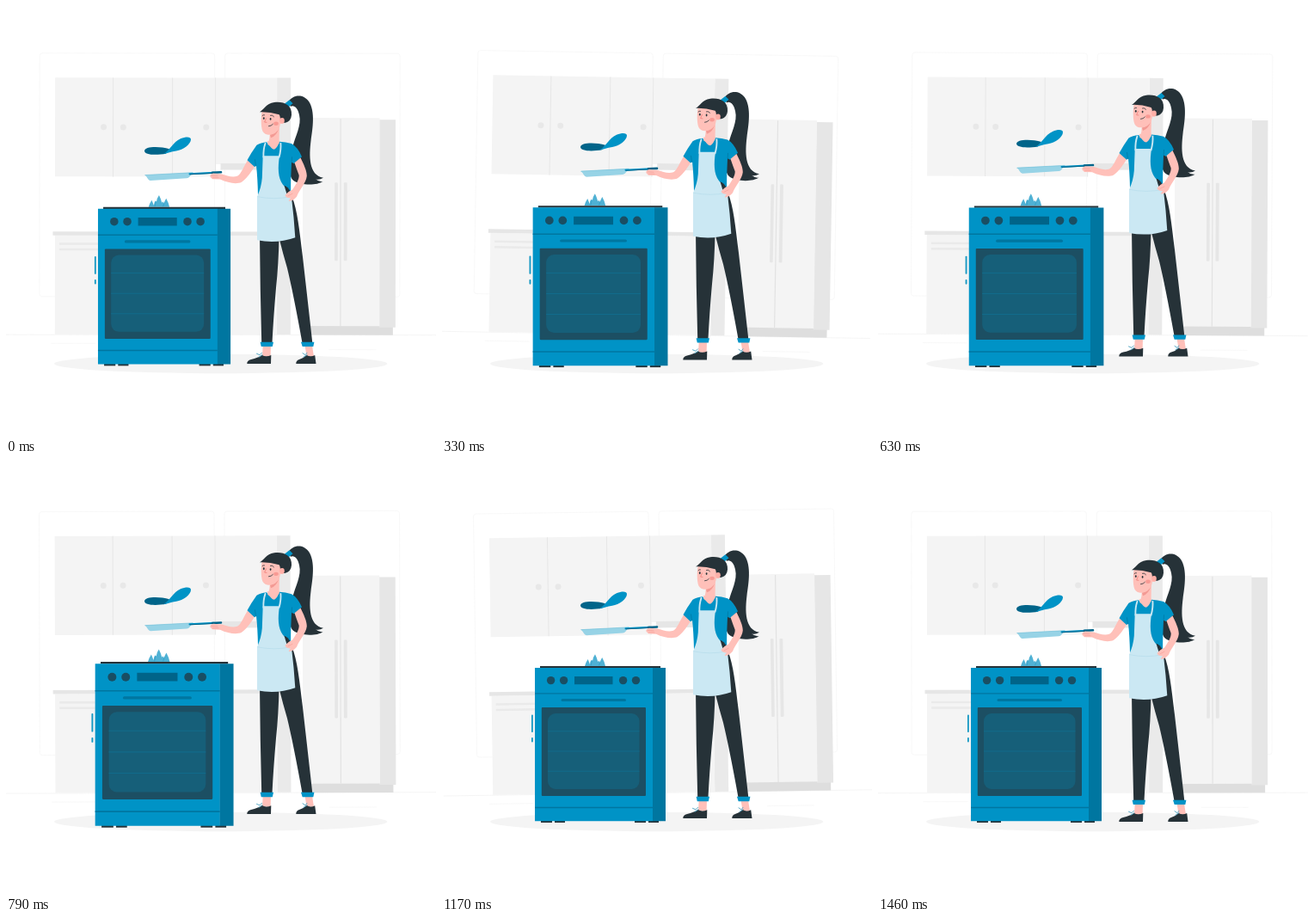
These frames come from a looping animation (500 px wide and 500 px high, 1.5 s). An HTML page with a canvas:

```html
<!DOCTYPE html>
<html lang="en">
<head>
<meta charset="utf-8">
<title>Cooking</title>
<style>
  html, body { margin: 0; width: 100%; height: 100%; overflow: hidden; background: #fff; }
  canvas { display: block; width: 500px; height: 500px; }
</style>
</head>
<body>
<canvas id="stage"></canvas>
<script>
const LOOP = 1500;
const STEP = LOOP / 36;
const canvas = document.getElementById('stage');
const ctx = canvas.getContext('2d');
const ratio = window.devicePixelRatio || 1;
canvas.width = canvas.height = 500 * ratio;

const BLUE = '#0093c6', DEEP = '#0076a0', NAVY = '#006489', DARK = '#263238';
const SKIN = '#ffc0b9', APRON = '#cbe8f3';
const WALL = '#f4f4f4', SHADE = '#e6e6e6', SIDE = '#eaeaea';

function rect(color, x1, y1, x2, y2, radius = 0) {
  ctx.fillStyle = color;
  ctx.beginPath();
  ctx.roundRect(x1, y1, x2 - x1, y2 - y1, radius);
  ctx.fill();
}

function dot(color, x, y, rx, ry = rx) {
  ctx.fillStyle = color;
  ctx.beginPath();
  ctx.ellipse(x, y, rx, ry, 0, 0, Math.PI * 2);
  ctx.fill();
}

function shape(color, d) {
  ctx.fillStyle = color;
  ctx.fill(new Path2D(d));
}

function line(color, width, d) {
  ctx.strokeStyle = color;
  ctx.lineWidth = width;
  ctx.lineCap = 'round';
  ctx.stroke(new Path2D(d));
}

// Piecewise linear track of [time, value] pairs, time in 0..1.
function track(keys, p) {
  const i = keys.findIndex(([time]) => time >= p);
  if (i < 1) return keys[0][1];
  const [t0, v0] = keys[i - 1], [t1, v1] = keys[i];
  return v0 + (v1 - v0) * (p - t0) / (t1 - t0);
}

const SWAY = [[0, 0], [.25, 1], [.75, -1], [1, 0]];
const BEAT = [[0, 1], [.1, 1.1], [.3, 1], [.4, 1], [.5, 1.1], [.6, 1], [1, 1]];
const FLOAT = [[0, 0], [.5, -10], [1, 0]];

function about(x, y, change, draw) {
  ctx.save();
  ctx.translate(x, y);
  change();
  ctx.translate(-x, -y);
  draw();
  ctx.restore();
}

function drawRoom() {
  for (const x of [39, 254.5]) {
    ctx.strokeStyle = '#f7f7f7';
    ctx.lineWidth = .8;
    ctx.beginPath();
    ctx.roundRect(x, 55, 203.5, 283, 3);
    ctx.stroke();
  }
  line('#efefef', .6, 'M0 382.4H500');
  line('#f3f3f3', .6, 'M53 392.5H104M376 399.5H430');

  // Upper cabinets and hood
  rect(SIDE, 315, 83.5, 331, 190);
  rect(WALL, 57, 83.5, 244, 198.5);
  rect(WALL, 244, 83.5, 315, 184);
  rect(SHADE, 249.5, 183, 320, 190.5);
  for (const x of [124.5, 193.5, 243.5]) rect(SHADE, x - .5, 83.5, x + .5, 198.5);
  for (const x of [113.5, 136.3, 232.7]) dot('#e8e8e8', x, 141, 3.5);

  // Lower cabinets
  rect(SIDE, 315, 267, 331, 382);
  rect(WALL, 57, 267, 315, 382);
  rect(SHADE, 54.5, 262.5, 331, 267);
  rect('#eaeaea', 62, 275.5, 109, 278);
  rect('#eaeaea', 62, 282, 109, 284.5);

  // Fridge
  rect('#dedede', 348, 371, 450, 382.5);
  rect(SHADE, 434, 132, 453, 373.5);
  rect(WALL, 345, 130, 434.5, 372);
  rect('#e2e2e2', 388.4, 131, 389.6, 372);
  rect(SHADE, 382.2, 205, 385.8, 296, 1);
  rect(SHADE, 392.8, 205, 396.6, 296, 1);
}

function drawStove() {
  shape('#4fb1d4', `M166 235Q167 231 169.6 227Q171 230 172 233Q172.3 229 174 227.5
    L175 229Q175.4 225 178 221.3Q180 225 181.3 230L182.5 228.5L183.3 231
    Q184.5 228 186.2 225Q189 230 190 235Z`);
  line('#2799c3', .6, 'M173.2 234Q173.8 231 174.3 229M182.7 234Q183.4 232 184 230');
  for (const [x1, x2] of [[115, 128], [131, 143], [224, 237], [240, 252]])
    rect(DARK, x1, 414.5, x2, 417);
  rect(DARK, 114, 235, 254, 237.2);
  rect(BLUE, 108, 237, 245.2, 415.2);
  rect(DEEP, 245, 237, 260, 415.2);
  for (const x of [126.6, 141.6, 210.6, 225.5]) dot('#194e63', x, 251.6, 4.7);
  rect(NAVY, 154, 247, 198.5, 256.3);
  rect(DEEP, 108, 266.2, 245, 267.6);
  rect(DEEP, 138.5, 273, 214, 276, 1.5);
  rect('#1c4f63', 115.8, 283, 237, 386, 1);
  rect('#165f79', 123, 290, 229.5, 378, 9);
  for (const y of [310.7, 334, 357.3]) rect('#116b8b', 123, y - .5, 229.5, y + .5);
  rect(DEEP, 108, 398.7, 245, 400.2);
  rect('#1598c3', 104, 291.5, 105.8, 312, .8);
  rect('#1598c3', 104, 318, 105.8, 323.5, .8);
}

function drawPanAndFood() {
  shape(NAVY, 'M161 168.7C161 163.5 178 163 190 166.5L186 172C174 174 161 173.5 161 168.7Z');
  shape(BLUE, `M183 172.3C191 168 194 158.5 203 154.5C209 152 215 152 215 155.3
    C215 161 206 167.5 198 168.8C192 169.8 188 171.5 183 172.3Z`);
  shape('#97d3e6', 'M161 196.7L218 193.8C215 195 214.5 200 210 200.6L168 203.4C165 203 164 198 161 196.7Z');
  line('#6fbfd9', .6, 'M162 196.8L217 194');
  line(BLUE, 2, 'M213.5 195.5L242 194');
  line(NAVY, 2.6, 'M240 194.1L250 193.6');
  line(NAVY, 1, 'M214 196L242 194.6');
}

function drawLegs() {
  shape(SKIN, 'M298.8 395L308 395L307.6 408L298 407Z');
  shape(SKIN, 'M347.5 395L356 395L358 408L349.5 407Z');
  shape(DARK, 'M280.3 416.2Q280 412.5 285 411.2Q293 409.5 297.5 406Q302 409 308.3 406.3L308 416.2Z');
  shape(DARK, 'M337.3 416.2Q337 412.5 341 411.2Q346.5 409.5 349.3 406Q354 409 359.2 406.3L360.5 416.2Z');
  line('#5aa9c5', 1, 'M291.5 404.5L295 406L297.5 403.5M294 408.5L298 406M345 404L348 406L350 403.5M346 408.5L350 406');
  shape(DARK, 'M318 262L332.5 222C339 238 341 260 345 292Q349 327 356.3 392H344.5Q334 334 327 305Q322 288 318 272Z');
  shape(DARK, 'M295 266L317.5 268Q317 300 314 328Q311 362 309.5 392H297.2Q295.5 330 295 266Z');
  shape(BLUE, 'M295.6 391H311L309.8 396.3H296.8Z');
  shape(BLUE, 'M343 391H358.4L357.3 396.3H344.7Z');
}

function drawHair() {
  shape(DARK, `M328 112C333 103.5 345 101.5 352 111C360 123 356.5 143 354.5 157
    C352.5 174 351.5 197 369 200Q364 203 360 201.5Q364 205 368.5 204.3
    C362 209 343 209.5 334 203C326 195 331 178 333 165
    C336 152 344 139 341 127C339.5 119 335 115 331 117Z`);
  shape(BLUE, 'M322.5 115L329.5 109.5L333.5 113.5L327 119Z');
}

function drawHead() {
  shape(SKIN, 'M306.5 145L318 136L317.5 160Q312 168 304 161Q307.5 155 306.5 145Z');
  shape('#f39a94', 'M307 150Q313 149 317 143Q315 151 308 153.5Z');
  shape(SKIN, `M298 121C296.5 128 296 140 298.5 146C301.5 151.5 309 150.5 313.5 147.5
    Q318 144 319 137C325 139 327 130 322 126L317 119Z`);
  shape(DARK, `M295 123.5C300 121 302 114 312 112.4C322 111 333 115 332 127
    Q331.5 134 325 136Q321 136.5 319 134Q319 128 317.6 126.5Q306 123 295 123.5Z`);
  dot('#ffafa7', 321, 133.5, 2.8, 3.3);
  dot('#f89a94', 314, 137, 2.8, 2.2);
  dot(DARK, 299.8, 130.9, .9, 1.4);
  dot(DARK, 307.6, 131.7, .9, 1.4);
  line(DARK, .8, 'M298 127.8Q299 126.5 300.5 127M307.5 127.5Q310 126.5 311.5 129');
  line('#ef7f79', .8, 'M302.5 131L300.6 135.3L303 135.6');
  line(DARK, .8, 'M305.5 140Q308.5 140 310.3 137.7');
}

function drawBody() {
  // Stretched arm
  shape(SKIN, `M281.5 179C276 187 274 195 269 198C263 200 257 197.5 251 195.7
    L241 194.8Q236.5 196 237.5 199L240 201.5L249 201.8C258 206 268 208 274 205
    C281 200 286 192 290 185Z`);
  line('#f39a94', .6, 'M239 197.6L246 198M240.5 200L247 200');

  // Shirt
  shape(BLUE, `M303 158.5Q296 159 291.5 162Q285 171 280.5 179.5L289 187.3L291 186
    Q292.5 199 293 220H331Q331 200 332 182L335 183.5L344 175.5
    Q339 164 332 160.3Q325 158.5 318 158Q311 169 303 158.5Z`);
  shape(SKIN, 'M303.5 157.5Q308 167 312 167Q316 165 318 157Z');
  line(DEEP, .7, 'M290.5 186L289.5 179M332.2 182L332.5 176');

  // Apron
  line(APRON, 1.9, 'M299.4 176Q299 167 301.5 160M317.6 176Q320 167 319.4 160');
  shape(APRON, `M298.7 174.5H318C316 188 316 200 322 208Q329 215 332 223
    Q335 247 336.3 269.5Q315 277 292 272.5V222Q297 211 297.8 200Z`);
  line('#b3dbe9', .6, 'M292.6 222Q312 226 331 222');

  // Arm on the hip
  shape(DARK, 'M323.5 209Q328 210 331 217L326.5 219Z');
  shape(SKIN, `M335.5 182.5L342.5 176.7C346 184 350 192 349.8 198
    C349 206 341 214 338 222Q333 228 328.5 227L331 223.5Q326 224 324.5 220.5
    Q328 215.5 333 214C337 208 341 202 340.7 197Q338 190 335.5 182.5Z`);
  line('#f39a94', .6, 'M328 221L333 218.5');
}

function drawCook() {
  drawHair();
  drawLegs();
  drawPanAndFood();
  drawBody();
  drawHead();
}

function render(now) {
  // The motion is held on 24 steps per second, each posed at its middle.
  const step = Math.floor((now % LOOP + 4) / STEP) % 36;
  const p = (step + .5) / 36;
  ctx.setTransform(ratio, 0, 0, ratio, 0, 0);
  ctx.fillStyle = '#fff';
  ctx.fillRect(0, 0, 500, 500);

  about(250, 228, () => ctx.rotate(track(SWAY, p) * Math.PI / 180), drawRoom);
  dot('#f4f4f4', 249.7, 416, 193.7, 11.2);
  const beat = track(BEAT, p);
  about(182, 319.3, () => ctx.scale(beat, beat), drawStove);
  about(0, 0, () => ctx.translate(0, track(FLOAT, p)), drawCook);
}

const start = performance.now();
function tick() {
  render(performance.now() - start);
  requestAnimationFrame(tick);
}
tick();
</script>
</body>
</html>
```
